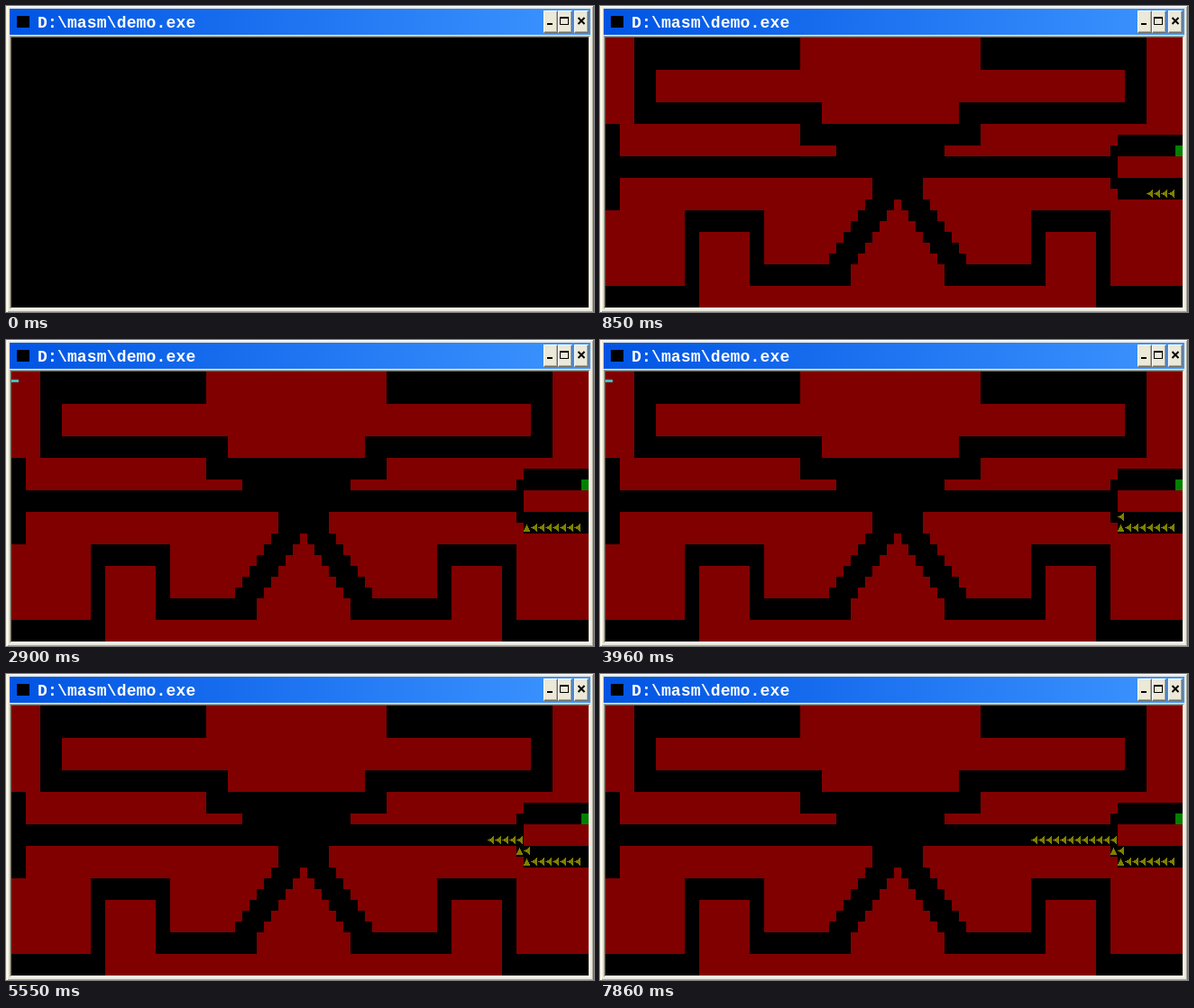
These frames come from a looping animation (652x340 px, 8 s). An HTML page:

```html
<!DOCTYPE html>
<html lang="en">
<head>
<meta charset="utf-8">
<title>demo.exe</title>
<style>
  html, body { margin: 0; width: 100%; height: 100%; overflow: hidden; background: #ece9d8; }
  .window { position: relative; width: 652px; height: 340px; overflow: hidden; }
  .window div, .window svg { position: absolute; box-sizing: border-box; }
  .frame {
    left: 0; top: -1px; width: 652px; height: 342px; background: #ece9d8;
    border: 1px solid; border-color: #f1efe2 #716f64 #716f64 #f1efe2;
    box-shadow: inset 1px 1px #fff, inset -1px -1px #aca899;
  }
  .bar { left: 4px; top: 3px; width: 644px; height: 29px; background: linear-gradient(90deg, #0054e3, #3d95ff); }
  .icon { left: 8px; top: 8px; width: 14px; height: 13px; background: #000; }
  .title {
    left: 31px; top: 2px; color: #fff; white-space: pre;
    font: bold 18px/29px "Liberation Mono", monospace; letter-spacing: .16px;
  }
  .button {
    top: 2px; width: 16px; height: 25px; background: #ece9d8;
    border: 1px solid; border-color: #fff #716f64 #716f64 #fff;
    box-shadow: inset -1px -1px #aca899;
  }
  .button svg { left: 0; top: 0; width: 14px; height: 23px; }
  .client {
    left: 4px; top: 33px; width: 644px; height: 304px; background: #000;
    border: 1px solid; border-color: #aca899 #fff #fff #aca899;
  }
  .client::before {
    content: ""; position: absolute; inset: 0;
    border: 1px solid; border-color: #716f64 #f1efe2 #f1efe2 #716f64;
  }
  #screen { left: 1px; top: 1px; shape-rendering: crispEdges; }
</style>
</head>
<body>
<div class="window">
  <div class="frame"></div>
  <div class="bar">
    <div class="icon"></div>
    <div class="title">D:\masm\demo.exe</div>
    <div class="button" style="left:592px"><svg><path d="M3 13h6v2h-6z"/></svg></div>
    <div class="button" style="left:608px"><svg><path fill-rule="evenodd" d="M1 6h10v9h-10zM2 8v6h8v-6z"/></svg></div>
    <div class="button" style="left:626px"><svg><path d="M3.5 7l7 7M10.5 7l-7 7" stroke="#000" stroke-width="2"/></svg></div>
  </div>
  <div class="client">
    <svg id="screen" width="640" height="300">
      <defs>
        <g id="L">
          <path d="M0 0h8v12h-8z"/>
          <path fill="#808000" d="M0 5h2v-1h2v-1h1v-1h1v-1h1v9h-1v-1h-1v-1h-1v-1h-2v-1h-2z"/>
        </g>
        <g id="U">
          <path d="M0 0h8v12h-8z"/>
          <path fill="#808000" d="M3 2h1v2h1v2h1v2h1v2h-7v-2h1v-2h1v-2h1z"/>
        </g>
      </defs>
      <g id="picture">
        <!-- One unit is one character cell of 8 by 12 pixels. -->
        <g transform="scale(8 12)" fill="none" stroke="#000" stroke-width="2">
          <path fill="#800000" stroke="none" d="M0 0h80v25h-80z"/>
          <g id="upper">
            <path stroke-width="3" d="M27 1.5H5.5V8"/>
            <path d="M4 7H30"/>
          </g>
          <use href="#upper" transform="matrix(-1 0 0 1 79 0)"/>
          <g id="lower">
            <path d="M0 24H12V17H21V22H34"/>
            <path stroke-width="1" d="M36 15.5h4m-5 1h4m-5 1h4m-5 1h4m-5 1h4m-5 1h4"/>
          </g>
          <use href="#lower" transform="matrix(-1 0 0 1 81 0)"/>
          <path d="M27 9H52M0 12H70M37 14H44M1 8V16M71 10H80M71 14H80"/>
          <path stroke-width="1" d="M32 10.5H47M70.5 10V14"/>
          <path stroke="#008000" stroke-width="1" d="M79 10.5h1"/>
        </g>
        <g id="trail"></g>
        <path id="cursor" fill="#40c0c0" d="M0 9h8v3h-8z"/>
      </g>
    </svg>
  </div>
</div>
<script>
  const LOOP = 8000, TICK = 66, LEAD = 10;      // ms
  const STRIDE = 9.6, PAIR_GAP = 3;             // ticks; steps come in pairs
  const BLINK_START = 4.62, BLINK = 7.956;      // ticks
  const $ = id => document.getElementById(id);

  // Start tick and directions of each run; lower case means the way is blocked.
  const runs = [[1.3, 'LLLLLLLl'], [36.9, 'U'], [60, 'L'], [62, 'U' + 'L'.repeat(12)]];
  const steps = [];
  let col = 78, row = 14;

  function addStep(tick, move) {
    const arrow = document.createElementNS('http://www.w3.org/2000/svg', 'use');
    arrow.setAttribute('href', '#' + move.toUpperCase());
    arrow.setAttribute('x', col * 8);
    arrow.setAttribute('y', row * 12);
    $('trail').append(arrow);
    steps.push({ tick, arrow });
    if (move === 'L') col--;
    if (move === 'U') row--;
  }

  for (const [first, moves] of runs) {
    [...moves].forEach((move, i) =>
      addStep(first + STRIDE * Math.floor(i / 2) + PAIR_GAP * (i % 2), move));
  }

  const show = (node, on) => node.setAttribute('visibility', on ? 'inherit' : 'hidden');
  const blinks = tick => Math.floor((tick - BLINK_START) / BLINK) + 1;

  function draw(t) {
    const tick = Math.floor((t + LEAD) / TICK);
    const end = tick + 0.999;
    let last = 0;
    show($('picture'), tick > 0);
    for (const step of steps) {
      const done = step.tick <= end;
      show(step.arrow, done);
      if (done) last = step.tick;
    }
    // Every step hides the cursor until its next blink.
    show($('cursor'), (blinks(end) - blinks(last)) % 2);
  }

  const start = performance.now();
  function update() {
    draw((performance.now() - start) % LOOP);
    requestAnimationFrame(update);
  }
  update();
</script>
</body>
</html>
```
